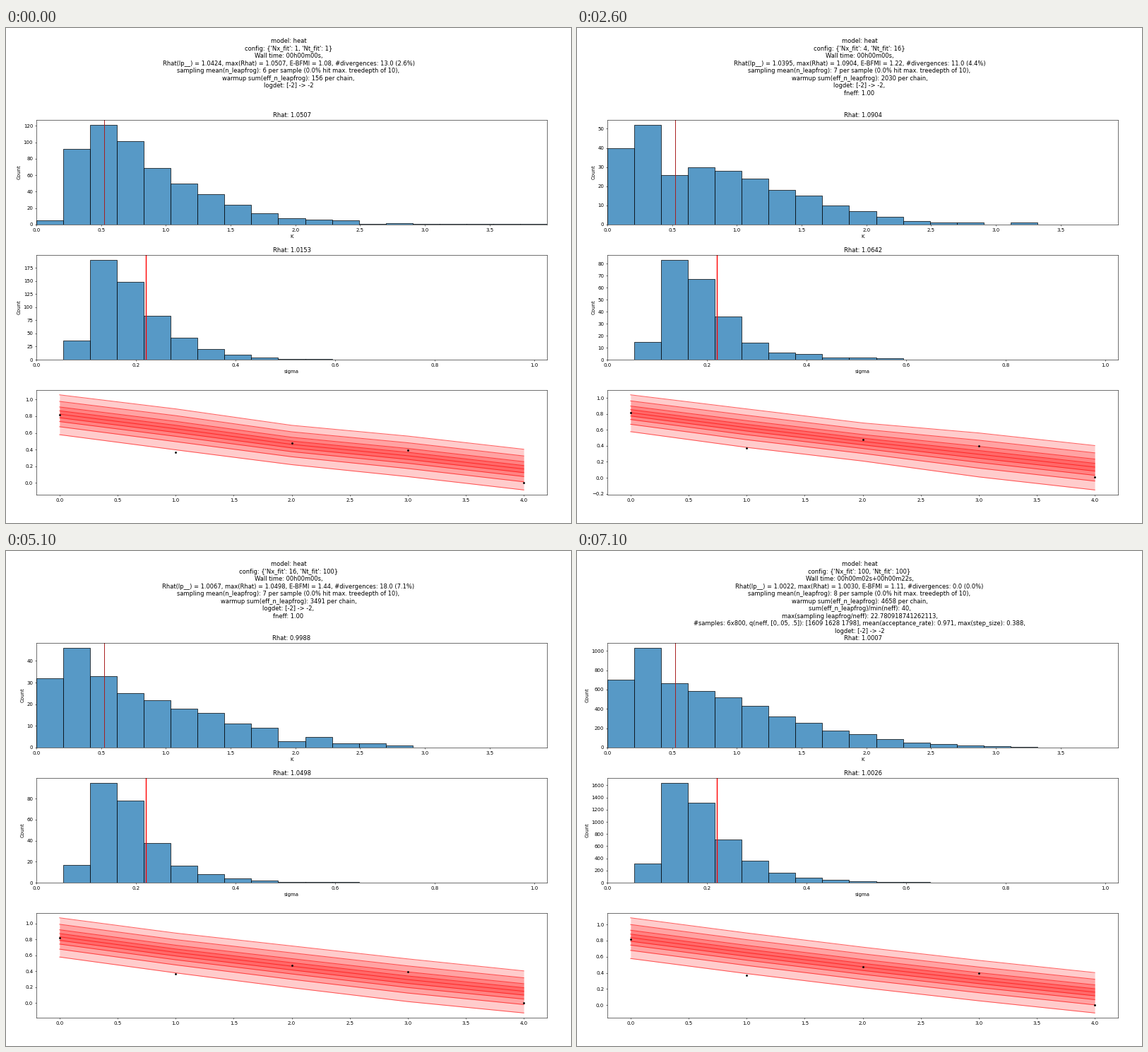
A matplotlib script that plays this animation: 800 px wide and 700 px high, repeating every 7.6 s.

```python
import numpy as np
import matplotlib.pyplot as plt
from matplotlib.animation import FuncAnimation
from matplotlib.colors import to_rgba

W, H, DPI = 800, 700, 50
STEPS, BINS = 16, 19
LAST = STEPS - 1
K_MAX, SIGMA_MAX = 3.944, 1.0257
QUANTILES = np.array([0, .2, .33, .425, .515, .6, .695, .835, 1])

# Which grid size is doubled at each step: time (t) or space (x)
REFINE = "ttxtx" * 2 + "txxx"

# Printed readouts: Rhat of K, of sigma, of lp__, E-BFMI, divergences, warmup leapfrogs
READOUTS = {
    0: (1.0507, 1.0153, 1.0424, 1.08, 13, 156),
    4: (1.0072, 1.0598, 1.1671, 0.94, 9, 1451),
    6: (1.0904, 1.0642, 1.0395, 1.22, 11, 2030),
    9: (1.0217, 1.0258, 1.0300, 1.38, 12, 2903),
    11: (0.9988, 1.0498, 1.0067, 1.44, 18, 3491),
    13: (1.0851, 1.0216, 1.0430, 1.03, 17, 4060),
    15: (1.0007, 1.0026, 1.0022, 1.11, 0, 4658),
}

# Key points by step: tallest bars, and the ends of the fan
K_PEAK = {0: 121, 1: 62, 4: 64, 6: 52, 9: 54, 11: 46, 13: 43, 14: 45, 15: 1030}
SIGMA_PEAK = {0: 190, 1: 85, 4: 74, 6: 83, 9: 90, 11: 95, 13: 69, 14: 75, 15: 1640}
FAN_HIGH = {0: 1.055, 4: 1.03, 6: 1.04, 9: 1.077, 11: 1.071, 13: 1.124, 15: 1.082}
FAN_LOW = {0: -.083, 4: -.094, 6: -.153, 9: -.056, 11: -.125, 14: -.145, 15: -.096}

FINAL_INFO = """Wall time: 00h00m02s+00h00m22s,
Rhat(lp__) = 1.0022, max(Rhat) = 1.0030, E-BFMI = 1.11, #divergences: 0.0 (0.0%)
sampling mean(n_leapfrog): 8 per sample (0.0% hit max. treedepth of 10),
warmup sum(eff_n_leapfrog): 4658 per chain,
sum(eff_n_leapfrog)/min(neff): 40,
max(sampling leapfrog/neff): 22.780918741262113,
#samples: 6x800, q(neff, [0,.05, .5]): [1609 1628 1798], mean(acceptance_rate): 0.971, max(step_size): 0.388,
logdet: [-2] -> -2"""


def at(step, points):
    return np.interp(step, list(points), list(points.values()))


def config(step):
    done = REFINE[:step]
    return [min(2 ** done.count(axis), 100) for axis in "xt"]


def heading(step, stats):
    nx, nt = config(step)
    head = f"model: heat\nconfig: {{'Nx_fit': {nx}, 'Nt_fit': {nt}}}\n"
    if step == LAST:
        return head + FINAL_INFO
    rhat_k, rhat_s, rhat_lp, bfmi, div, warmup = stats
    div = round(div)
    percent = 100 * div / (504 if step == 0 else 252)
    tail = "" if step == 0 else ",\nfneff: 1.00"
    return (
        f"{head}Wall time: 00h00m00s,\n"
        f"Rhat(lp__) = {rhat_lp:.4f}, max(Rhat) = {max(rhat_k, rhat_s):.4f}, "
        f"E-BFMI = {bfmi:.2f}, #divergences: {div:.1f} ({percent:.1f}%)\n"
        f"sampling mean(n_leapfrog): {6 if step == 0 else 7} per sample "
        "(0.0% hit max. treedepth of 10),\n"
        f"warmup sum(eff_n_leapfrog): {warmup:.0f} per chain,\n"
        f"logdet: [-2] -> {-1 if step == 4 else -2}{tail}"
    )


def k_shape(step):
    """Log-normal at first, then a half-normal with a narrow spike."""
    i = np.arange(BINS)
    c = i + .5
    early = np.exp(-(np.log(c / 3.5) / .88) ** 2) / c
    late = np.exp(-(i / 6.8) ** 2) + .45 * np.exp(-((i - 1) / .35) ** 2)
    mix = min(step / 2, 1)
    return (1 - mix) * early / early.max() + mix * late / late.max()


def sigma_shape():
    """Inverse gamma density."""
    c = np.arange(BINS) + .5
    return c ** -7.8 * np.exp(-21 / c)


def counts(shape, peak, rng):
    mean = shape / shape.max() * peak
    noisy = mean + .5 * np.sqrt(mean) * rng.normal(size=BINS)
    heights = np.clip(np.round(noisy), 0, round(peak))
    heights[shape.argmax()] = round(peak)
    return heights


def fan_lines(step, rng):
    t = xs / 4
    center = .831 - .194 * xs + .006 * xs ** 2
    wobble = 0 if step == LAST else .012 * np.sin(np.pi * t) * rng.normal(size=(2, 5))
    top, bottom = center + np.array([[.253], [-.253]]) + wobble
    top += (at(step, FAN_HIGH) - top[0]) * (1 - t)
    bottom += (at(step, FAN_LOW) - bottom[-1]) * t
    return bottom + QUANTILES[:, None] * (top - bottom)


def make_step(step):
    rng = np.random.default_rng(step)
    stats = [at(step, dict(zip(READOUTS, col))) for col in zip(*READOUTS.values())]
    return dict(
        text=heading(step, stats),
        rhat=stats[:2],
        hists=[counts(k_shape(step), at(step, K_PEAK), rng),
               counts(sigma_shape(), at(step, SIGMA_PEAK), rng)],
        fan=fan_lines(step, rng),
    )


def add_axes(top):
    return fig.add_axes([43 / W, 1 - (top + 148) / H, 723 / W, 148 / H])


def add_hist(top, label, x_max, mark, **line):
    ax = add_axes(top)
    width = x_max / BINS
    bars = ax.bar(np.arange(BINS) * width, np.ones(BINS), width, align="edge",
                  facecolor=to_rgba("C0", .75), edgecolor="black", linewidth=1)
    ax.axvline(mark, **line)
    ax.set_xlim(0, x_max)
    ax.set_xlabel(label)
    ax.set_ylabel("Count")
    return ax, bars


fig = plt.figure(figsize=(W / DPI, H / DPI), dpi=DPI, facecolor="white")
title = fig.suptitle("", linespacing=1.215)
hists = [
    add_hist(130, "K", K_MAX, .523, color="#a81c1c", lw=1.4),
    add_hist(321, "sigma", SIGMA_MAX, .2205, color="red", lw=2),
]

fan_ax = add_axes(512)
xs = np.arange(5)
bands = [fan_ax.fill_between(xs, 0, 1, color="red", alpha=.2, lw=0) for _ in range(4)]
curves = [fan_ax.plot(xs, xs, color="red", alpha=.6, lw=1.5)[0] for _ in QUANTILES]
fan_ax.plot(xs, [.82, .37, .475, .395, .005], "k.")
fan_ax.set_xlim(-.2, 4.2)

steps = [make_step(s) for s in range(STEPS)]


def draw(frame):
    # The first step lasts one frame, the others five.
    data = steps[(frame + 4) // 5]
    title.set_text(data["text"])

    for (ax, bars), rhat, heights in zip(hists, data["rhat"], data["hists"]):
        for bar, height in zip(bars, heights):
            bar.set_height(height)
        ax.set_ylim(0, 1.05 * heights.max())
        ax.set_title(f"Rhat: {rhat:.4f}")

    fan = data["fan"]
    for curve, ys in zip(curves, fan):
        curve.set_ydata(ys)
    for i, band in enumerate(bands):
        outline = np.concatenate([fan[i], fan[-1 - i][::-1]])
        band.set_verts([np.column_stack([np.r_[xs, xs[::-1]], outline])])
    margin = .05 * np.ptp(fan)
    fan_ax.set_ylim(fan.min() - margin, fan.max() + margin)


anim = FuncAnimation(fig, draw, frames=76, interval=100, repeat=True, repeat_delay=0)
plt.show()
```
